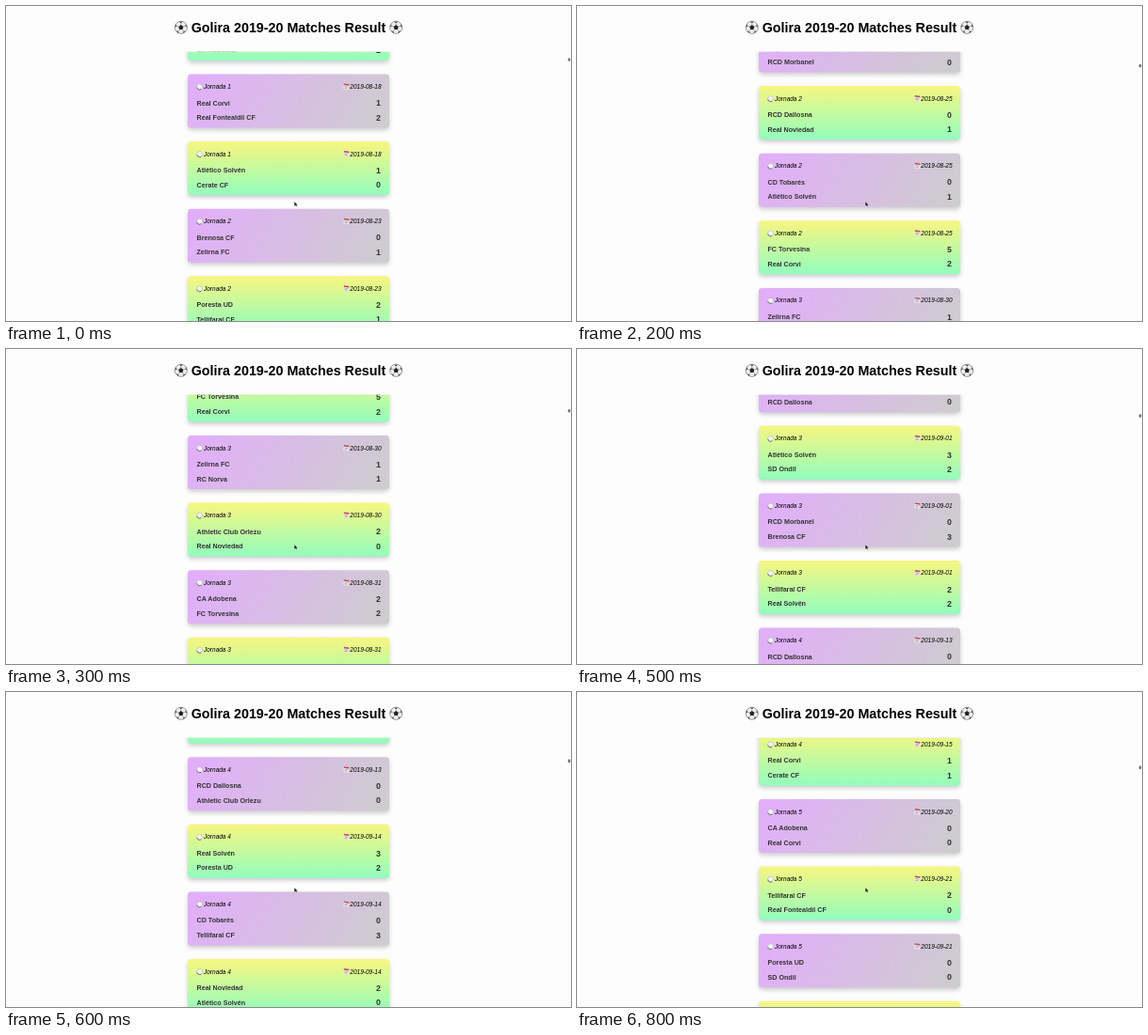
An HTML page for the animation above (0.9 s loop, 600 by 335 pixels).

```html
<!DOCTYPE html>
<html lang="es">
<head>
<meta charset="utf-8">
<title>Matches Result</title>
<style>
  @property --scroll { syntax: "<number>"; inherits: true; initial-value: 500.3; }
  html, body { margin: 0; width: 100%; height: 100%; overflow: hidden; background: #fefdfe; }
  svg { display: block; width: 600px; height: 335px; animation: scroll 900ms step-end infinite; }
  text { font-family: "Liberation Sans", Arial, sans-serif; font-weight: bold; }
  .title { font-size: 14.3px; text-anchor: middle; }
  .team { font-size: 7.15px; fill: #333; }
  .score { font-size: 8.8px; fill: #333; text-anchor: end; }
  .info { font-size: 6.5px; font-weight: normal; font-style: italic; }
  .date { text-anchor: end; }
  #list { transform: translate(193px, calc(var(--scroll) * -1px)); }
  #thumb { transform: translateY(calc(var(--scroll) * .0104px)); }
  @keyframes scroll {
    0% { --scroll: 500.3; }
    11.11% { --scroll: 846; }
    22.22% { --scroll: 1132.1; }
    33.33% { --scroll: 1340; }
    44.44% { --scroll: 1500.2; }
    55.55% { --scroll: 1851.4; }
    66.66% { --scroll: 2078.8; }
    77.77% { --scroll: 2410; }
    88.88%, 100% { --scroll: 2750; }
  }
</style>
</head>
<body>
<svg viewBox="0 0 600 335">
  <defs>
    <linearGradient id="violet" gradientUnits="userSpaceOnUse" x1="14.4" y1="-25" x2="199.6" y2="82">
      <stop stop-color="#e2adfb"/><stop offset="1" stop-color="#cdcdcd"/>
    </linearGradient>
    <linearGradient id="lime" x2="0" y2="1">
      <stop stop-color="#f7f680"/><stop offset="1" stop-color="#92fdbd"/>
    </linearGradient>
    <filter id="blur" x="-10%" y="-30%" width="120%" height="160%"><feGaussianBlur stdDeviation="2.6"/></filter>
    <clipPath id="view"><rect y="48.7" width="600" height="287"/></clipPath>
    <g id="ball">
      <circle r="6.6" fill="#eee" stroke="#777" stroke-width=".7"/>
      <path id="patch" d="M0-2.7 2.6-.8 1.6 2.2H-1.6L-2.6-.8Z" fill="#222"/>
      <path d="M0-2.7V-5M2.6-.8 5-1.6M1.6 2.2 3 4.2M-1.6 2.2-3 4.2M-2.6-.8-5-1.6" stroke="#777" stroke-width=".6"/>
      <path d="M-2-6.1 0-4.8 2-6.1ZM5.1-3.9 4.8-1.5 6.4.2ZM5.2 3.8 2.9 4.1 2 6.2ZM-5.2 3.8-2.9 4.1-2 6.2ZM-5.1-3.9-4.8-1.5-6.4.2Z" fill="#222"/>
    </g>
    <g id="whistle">
      <circle r="3" fill="#f4f1f4" stroke="#aaa" stroke-width=".5"/>
      <path d="M-2.9 .6A3 3 0 0 0 1.5 2.6" fill="none" stroke="#555" stroke-width=".8"/>
    </g>
    <g id="calendar" transform="rotate(8)">
      <rect x="-2.7" y="-2.7" width="5.4" height="5.6" fill="#eee5ee"/>
      <path d="M-2.8-2.1H2.8" stroke="#c4474f" stroke-width="1.5"/>
      <path d="M-1.7 0H2M-1.4 1.6H1.2" stroke="#777" stroke-width=".7" stroke-dasharray="1 .5"/>
    </g>
  </defs>
  <rect width="600" height="335" fill="#fefdfe"/>
  <text class="title" x="300" y="28">Golira 2019-20 Matches Result</text>
  <use href="#ball" x="185.8" y="22.8"/>
  <use href="#ball" x="414.2" y="22.8"/>
  <g clip-path="url(#view)"><g id="list"></g></g>
  <rect id="thumb" x="596.8" y="50" width="2.5" height="3.6" rx="1.2" fill="#777"/>
  <path d="M306.2 208V213L307.4 212 308.2 213.6 309 213.2 308.3 211.7H309.9Z" fill="#111" stroke="#fff" stroke-width=".3"/>
</svg>
<script>
  const PITCH = 71.6, FIRST = 7, PER_ROUND = 10;
  // date | home | goals | away | goals
  const matches = `08-18|CD Tobarés|1|CA Adobena|2
08-18|Real Corvi|1|Real Fontealdil CF|2
08-18|Atlético Solvén|1|Cerate CF|0
08-23|Brenosa CF|0|Zelirna FC|1
08-23|Poresta UD|2|Tellifaral CF|1
08-24|CA Adobena|0|SD Ondil|0
08-24|Real Solvén|1|Real Fontealdil CF|1
08-24|RC Norva|1|Tavirena CF|0
08-24|Cerate CF|1|Athletic Club Orlezu|1
08-25|Deportivo Dolvés|0|RCD Morbanel|0
08-25|RCD Dallosna|0|Real Noviedad|1
08-25|CD Tobarés|0|Atlético Solvén|1
08-25|FC Torvesina|5|Real Corvi|2
08-30|Zelirna FC|1|RC Norva|1
08-30|Athletic Club Orlezu|2|Real Noviedad|0
08-31|CA Adobena|2|FC Torvesina|2
08-31|Cerate CF|1|Deportivo Dolvés|1
08-31|Poresta UD|2|Real Fontealdil CF|0
08-31|Real Corvi|2|CD Tobarés|1
09-01|Tavirena CF|2|RCD Dallosna|0
09-01|Atlético Solvén|3|SD Ondil|2
09-01|RCD Morbanel|0|Brenosa CF|3
09-01|Tellifaral CF|2|Real Solvén|2
09-13|RCD Dallosna|0|Athletic Club Orlezu|0
09-14|Real Solvén|3|Poresta UD|2
09-14|CD Tobarés|0|Tellifaral CF|3
09-14|Real Noviedad|2|Atlético Solvén|0
09-14|FC Torvesina|5|Tavirena CF|2
09-15|SD Ondil|1|RCD Morbanel|2
09-15|Deportivo Dolvés|0|Zelirna FC|1
09-15|RC Norva|0|Brenosa CF|2
09-15|Real Fontealdil CF|1|CA Adobena|1
09-15|Real Corvi|1|Cerate CF|1
09-20|CA Adobena|0|Real Corvi|0
09-21|Tellifaral CF|2|Real Fontealdil CF|0
09-21|Poresta UD|0|SD Ondil|0
09-21|Atlético Solvén|0|RC Norva|0`.split("\n");

  const row = (team, goals, y) =>
    `<text class="team" x="9.5" y="${y}">${team}</text>
     <text class="score" x="205" y="${y + .7}">${goals}</text>`;

  const card = (match, n) => {
    const index = n + FIRST;
    const [date, home, homeGoals, away, awayGoals] = match.split("|");
    return `<g transform="translate(0 ${index * PITCH})">
      <rect y="2.5" width="214" height="57" rx="4" opacity=".2" filter="url(#blur)"/>
      <rect width="214" height="57" rx="3.5" fill="url(#${index % 2 ? "lime" : "violet"})"/>
      <use href="#whistle" x="12.6" y="13.5"/>
      <text class="info" x="17" y="15.5">Jornada ${Math.floor(index / PER_ROUND) + 1}</text>
      <use href="#calendar" x="168.3" y="13.2"/>
      <text class="info date" x="205.6" y="15.5">2019-${date}</text>
      ${row(home, homeGoals, 33.1)}${row(away, awayGoals, 48.5)}
    </g>`;
  };
  document.getElementById("list").innerHTML = matches.map(card).join("");
</script>
</body>
</html>
```
